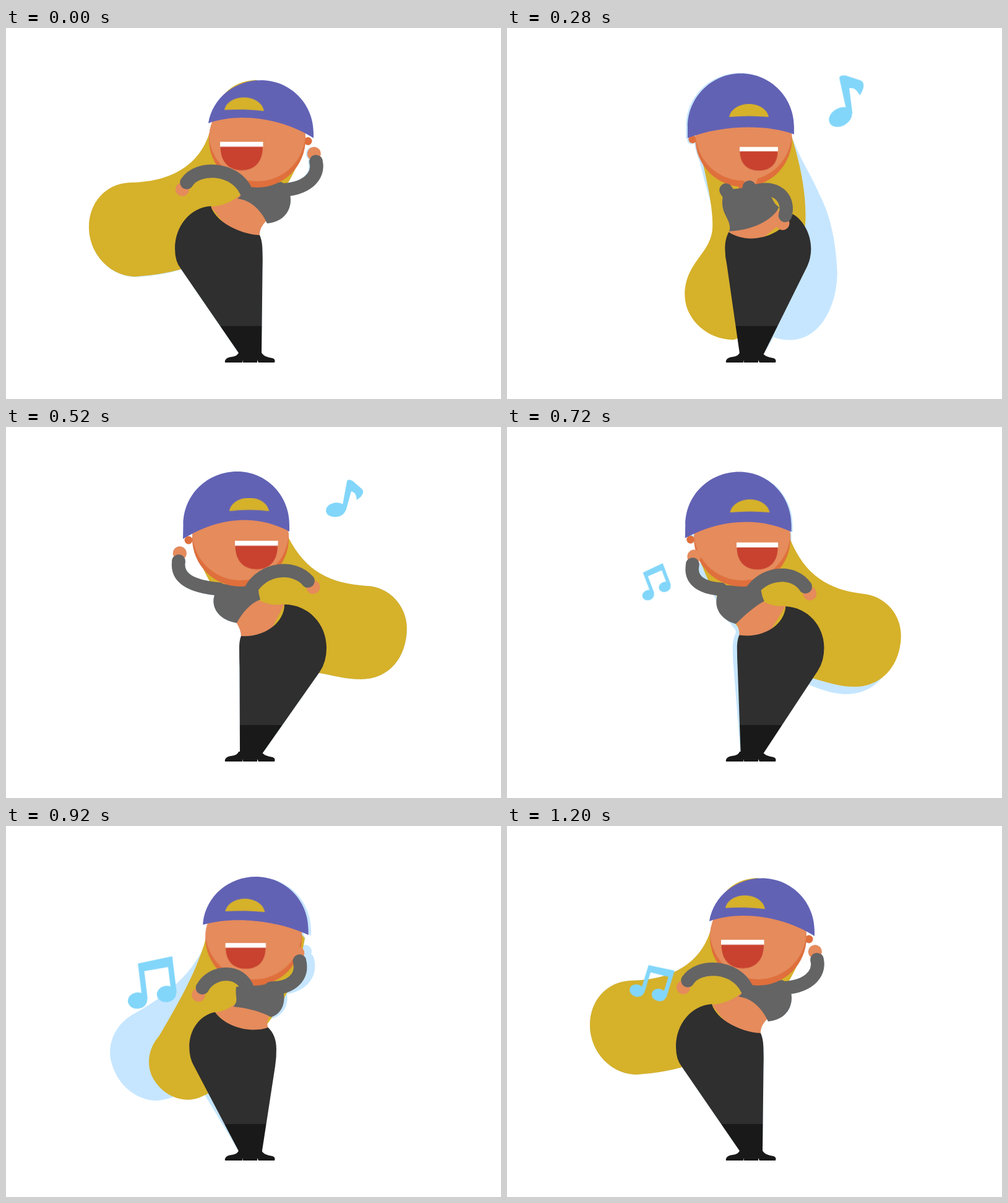
Recreate the animation shown at these times as an HTML page without scripts. Size 800 by 600 pixels, loop 1240 ms.

```html
<!DOCTYPE html>
<html lang="en">
<head>
<meta charset="utf-8">
<title>Dancing girl</title>
<style>
html, body { margin: 0; width: 100%; height: 100%; overflow: hidden; background: #fff; }
svg { display: block; width: 800px; height: 600px; }

.hair, .pants, .belly, .torso, .cap, .arm, .face, .ear, .mouth, .gap, .note {
  animation: 1240ms cubic-bezier(.2, .6, .4, 1) infinite;
}
.hair { animation-name: hair; }
.pants { animation-name: pants; }
.belly { animation-name: belly; }
.torso { animation-name: torso; }
.cap { animation-name: cap; }
.face { animation-name: face; }
.ear { animation-name: ear; }
.mouth { animation-name: mouth; }
.gap { animation-name: gap; }
.arm { fill: none; stroke: #646464; stroke-width: 21.5; stroke-linecap: round; marker-end: url(#hand); }
.hip { animation-name: hip; }
.wave { animation-name: wave; }
.single { animation-name: single; }
.pair { animation-name: pair; }

/* The pale silhouette runs slightly ahead of the figure. */
.shade * { fill: #c6e6ff; animation-delay: -40ms; }
.shade .arm { fill: none; stroke: #c6e6ff; marker-end: url(#palehand); }

@keyframes hair {
  0%, 1.6%, 90.3%, 100% { d: path("M405 84C360 86 340 115 333 152C322 215 275 249 200 250C160 252 134 283 134 322C134 365 168 402 210 402C300 395 330 375 400 320C455 265 475 220 484 180Z"); animation-timing-function: ease-in; }
  12.9% { d: path("M400 84C355 88 333 120 328 175C322 215 280 265 208 272C173 276 148 305 149 340C152 378 185 422 225 422C295 418 340 395 400 330C455 270 472 225 482 180Z"); animation-timing-function: linear; }
  22.58% { d: path("M370 84C330 90 303 150 310 190C322 240 333 290 331 318C330 362 283 375 283 432C283 470 318 506 362 507C400 500 478 400 482 310C483 260 472 215 460 175Z"); animation-timing-function: linear; }
  25.8% { d: path("M370 84C325 90 300 150 308 200C320 260 350 350 375 440C390 485 420 506 455 506C505 506 532 450 532 395C530 350 522 305 504 270C490 235 475 215 460 175Z"); }
  43%, 51.6% { d: path("M370 84C325 90 300 150 306 195C320 250 400 385 507 398C530 402 550 408 573 408C620 408 648 372 648 325C648 290 620 258 583 257C525 253 485 235 456 178Z"); animation-timing-function: ease-in; }
  67.74% { d: path("M370 86C330 90 300 150 308 190C310 260 345 370 455 438C475 453 495 463 520 463C565 463 597 420 597 378C597 350 580 326 548 315C500 297 470 260 462 190Z"); animation-timing-function: linear; }
  71% { d: path("M400 84C350 88 325 130 320 165C295 240 303 320 365 450C380 480 405 500 437 500C485 500 512 460 512 425C510 385 500 340 492 300C485 260 482 220 480 185Z"); }
  80.65% { d: path("M405 84C360 86 340 115 333 152C325 215 275 262 200 295C172 308 154 333 154 365C158 412 195 445 232 445C290 440 330 400 400 320C455 265 475 220 484 180Z"); }
}
@keyframes pants {
  0%, 3.2%, 88.7%, 100% { d: path("M331 288C298 290 273 320 273 357Q273 378 283 390L377 527H413L414.5 390Q415 375 414.5 362C414.5 350 413 342 410 335C375 333 338 312 331 288Z"); animation-timing-function: ease-in; }
  12.9% { d: path("M333 290C304 292 283 322 283 357Q283 376 291 391L377 527H414L422 390Q423 375 423 362C423 350 421 342 419 336C383 336 344 316 333 290Z"); animation-timing-function: linear; }
  22.58% { d: path("M358 330C354 338 352 346 352 357Q352 370 355 383L376 527H415L485 385Q491 372 491 357C491 335 480 312 462 301C445 338 390 352 358 330Z"); }
  40.3%, 53.2% { d: path("M380 338C378 342 377 350 377 357Q377 375 377.5 390L378 527H415L507 396Q518 380 518 357C518 318 488 287 450 287C450 318 415 341 380 338Z"); animation-timing-function: ease-in; }
  67.74% { d: path("M352 328C347 338 345 347 345 357Q345 372 348 385L376 527H415L478 385Q484 372 484 357C484 338 474 318 452 306C440 342 390 352 352 328Z"); }
}
@keyframes belly {
  0%, 3.2%, 88.7%, 100% { d: path("M331 289Q360 287 381 268L436 300Q408 318 410 336L375 345Z"); animation-timing-function: ease-in; }
  12.9% { d: path("M333 291Q350 288 366 280L436 302Q416 318 419 336L380 345Z"); animation-timing-function: linear; }
  22.58% { d: path("M358 331Q360 328 362 318L430 285Q445 305 460 303L400 350Z"); }
  40.3%, 53.2% { d: path("M380 339Q380 328 372 316L400 275Q425 292 450 286L420 345Z"); animation-timing-function: ease-in; }
  67.74% { d: path("M352 328Q356 325 360 318L435 288Q440 296 452 306L400 345Z"); }
}
@keyframes torso {
  0%, 3.2%, 88.7%, 100% { d: path("M380 258L445 249C468 262 468 312 422 316C412 294 395 278 374 276C382 270 382 266 380 258Z"); animation-timing-function: ease-in; }
  12.9% { d: path("M378 258L443 252C463 264 463 308 421 316C405 296 390 284 363 282C375 275 378 268 378 258Z"); animation-timing-function: linear; }
  22.58% { d: path("M352 262L405 256C432 265 425 280 440 290C430 312 395 328 359 329C366 308 338 300 352 262Z"); }
  40.3%, 53.2% { d: path("M352 254L408 260C408 268 409 272 411 279C395 285 382 300 373 317C330 310 325 270 352 254Z"); animation-timing-function: ease-in; }
  67.74% { d: path("M355 265L415 256C432 265 425 284 441 294C425 318 390 329 354 326C366 305 344 300 355 265Z"); }
}
@keyframes cap {
  0%, 3.2%, 87%, 100% { d: path("M327 154L327 154C334 112 371 84.5 412 84.5C459 84.5 497 122 497 170L497 178C450 148 380 135 327 154Z"); animation-timing-function: ease-in; }
  12.9% { d: path("M325 156L325 156C333 112 369 83.5 410 83.5C457 83.5 495 121 495 168L495 178C450 150 380 140 325 156Z"); animation-timing-function: linear; }
  22.58% { d: path("M292 178L292 160C292 112 331 73.5 378 73.5C426 73.5 464 112 464 160L464 172C420 155 345 157 292 178Z"); }
  40.3%, 53.2% { d: path("M286 181L286.5 158C286.5 110 325 72 374 72C420 72 459 110 458 160L458 169C410 143 350 142 286 181Z"); animation-timing-function: ease-in; }
  67.74% { d: path("M297 174L297 162C297 113 336 75.5 383 75.5C430 75.5 468 113 468 162L468 172C420 167 345 168 297 174Z"); }
}
@keyframes gap {
  0%, 3.2%, 87%, 100% { transform: translate(353px, 132.5px) rotate(1.5deg); animation-timing-function: ease-in; }
  12.9% { transform: translate(354px, 135.5px) rotate(1deg); animation-timing-function: linear; }
  22.58% { transform: translate(359px, 144px) rotate(0deg); }
  40.3%, 53.2% { transform: translate(361px, 135.5px) rotate(0deg); animation-timing-function: ease-in; }
  67.74% { transform: translate(358px, 152px) rotate(0deg); }
}
@keyframes face {
  0%, 3.2%, 87%, 100% { transform: translate(406px, 180px); animation-timing-function: ease-in; }
  12.9% { transform: translate(404.5px, 180px); animation-timing-function: linear; }
  22.58% { transform: translate(382.5px, 179px); }
  40.3%, 53.2% { transform: translate(379px, 180px); animation-timing-function: ease-in; }
  67.74% { transform: translate(386px, 181px); }
}
@keyframes ear {
  0%, 3.2%, 87%, 100% { transform: translate(488px, 183px); animation-timing-function: ease-in; }
  12.9% { transform: translate(486px, 182px); animation-timing-function: linear; }
  22.58% { transform: translate(300px, 180px); }
  40.3%, 53.2% { transform: translate(295px, 183px); animation-timing-function: ease-in; }
  67.74% { transform: translate(305px, 177px); }
}
@keyframes mouth {
  0%, 3.2%, 87%, 100% { transform: translate(346px, 183.5px) scale(1); animation-timing-function: ease-in; }
  12.9% { transform: translate(345px, 185px) scale(.97, .95); animation-timing-function: linear; }
  22.58% { transform: translate(376px, 192.5px) scale(.89, .82); }
  40.3%, 53.2% { transform: translate(370px, 183.5px) scale(1); animation-timing-function: ease-in; }
  67.74% { transform: translate(376px, 203.5px) scale(.79, .63); }
}
@keyframes hip {
  0%, 1.6%, 90.3%, 100% { d: path("M388 264C370 225 310 222 292 250"); animation-timing-function: ease-in; }
  12.9% { d: path("M386 262C360 245 318 246 306 281"); animation-timing-function: linear; }
  22.58% { d: path("M405 263C440 255 457 280 449 304"); }
  41.9%, 51.6% { d: path("M395 264C415 227 466 223 488 249"); animation-timing-function: ease-in; }
  67.74% { d: path("M402 263C440 248 466 270 462 292"); }
  80.65% { d: path("M389 264C370 228 313 227 295 257"); }
}
@keyframes wave {
  0%, 1.6%, 91%, 100% { d: path("M442 262C485 262 507 240 501 216"); animation-timing-function: ease-in; }
  12.9% { d: path("M432 262C458 262 467 240 450 218"); animation-timing-function: linear; }
  22.58% { d: path("M354 262C365 282 390 278 393 258"); }
  41.9%, 51.6% { d: path("M344 262C300 258 275 245 279 217"); animation-timing-function: ease-in; }
  67.74% { d: path("M352 264C360 266 366 256 374 240"); }
  80.65% { d: path("M440 262C480 262 498 240 490 215"); }
}
@keyframes single {
  0%, 6% { transform: translate(546px, 140px) rotate(-40deg) scale(0); }
  12.9% { transform: translate(544px, 142px) rotate(-33deg) scale(1.15); animation-timing-function: linear; }
  22.58% { transform: translate(539px, 144px) rotate(-23deg) scale(1.25); animation-timing-function: linear; }
  41.94% { transform: translate(533px, 134px) rotate(0deg) scale(1); animation-timing-function: ease-in; }
  48.4%, 100% { transform: translate(531px, 130px) rotate(8deg) scale(0); }
}
@keyframes pair {
  0%, 56% { transform: translate(240px, 248px) rotate(-24deg) scale(0); }
  62.9% { transform: translate(240px, 248px) rotate(-19deg) scale(.9); animation-timing-function: linear; }
  67.74% { transform: translate(240px, 249px) rotate(-14deg) scale(.95); animation-timing-function: linear; }
  80.65% { transform: translate(240px, 250px) rotate(0deg) scale(1); animation-timing-function: linear; }
  96.77% { transform: translate(239px, 252px) rotate(17deg) scale(.74); animation-timing-function: ease-in; }
  100% { transform: translate(239px, 252px) rotate(21deg) scale(0); }
}
</style>
</head>
<body>
<svg viewBox="0 0 800 600">
  <defs>
    <linearGradient id="legs" gradientUnits="userSpaceOnUse" x1="0" y1="0" x2="0" y2="600">
      <stop offset=".804" stop-color="#2f2f2f"/>
      <stop offset=".804" stop-color="#191919"/>
    </linearGradient>
    <clipPath id="round"><circle r="78"/></clipPath>
    <marker id="hand" markerUnits="userSpaceOnUse" markerWidth="60" markerHeight="60" viewBox="-30 -30 60 60" orient="auto">
      <circle cx="13" r="11" fill="#e58b5c"/>
      <circle r="10.75" fill="#646464"/>
    </marker>
    <marker id="palehand" markerUnits="userSpaceOnUse" markerWidth="60" markerHeight="60" viewBox="-30 -30 60 60" orient="auto">
      <circle cx="13" r="11" fill="#c6e6ff"/>
    </marker>
  </defs>

  <g class="shade">
    <path class="hair"/>
    <path class="belly"/>
    <path class="pants"/>
    <path class="torso"/>
    <circle class="ear" r="6.5"/>
    <circle class="face" r="78"/>
    <path class="cap"/>
    <path class="arm hip"/>
    <path class="arm wave"/>
  </g>

  <path class="hair" fill="#d6b12a"/>
  <path class="belly" fill="#e58b5c"/>
  <path class="pants" fill="url(#legs)"/>
  <path fill="#191919" d="M376 525C372 534 362 530 356 535Q353 538 354 541H382L383 537V541H406V537L408 541H434Q436 536 431 534C420 532 416 530 413 525Z"/>
  <g class="face"><rect x="-8" y="60" width="28" height="24" fill="#df6f3c"/></g>
  <path class="torso" fill="#646464"/>
  <circle class="ear" r="6.5" fill="#df6f3c"/>
  <g class="face">
    <circle r="78" fill="#df6f3c"/>
    <circle cy="-10" r="78" fill="#e58b5c" clip-path="url(#round)"/>
  </g>
  <g class="mouth">
    <path fill="#c8422f" d="M.5 8H69C69 34 55 46.5 35 46.5S.5 34 .5 8Z"/>
    <path fill="#fff" d="M0 0H69.5V8.5H0Z"/>
  </g>
  <path class="cap" fill="#6262b4"/>
  <path class="gap" fill="#d6b12a" d="M0 0C6 -28 58 -28 64 0Q32 -3 0 0Z"/>
  <path class="arm hip"/>
  <path class="arm wave"/>

  <g fill="#82d6fa">
    <g class="note single">
      <ellipse rx="16" ry="11.5" transform="rotate(-8)"/>
      <path d="M16 2L25 -30C28 -29 33 -28 34 -16C43 -22 47 -29 42 -34L27 -47Q19 -51 18 -46L11 -8Z"/>
    </g>
    <g class="note pair">
      <ellipse cx="-32" cy="30" rx="16" ry="13.5"/>
      <ellipse cx="17" cy="25" rx="16" ry="13.5"/>
      <path d="M-24 30V-31L34 -36V25H25V-19L-15 -17V30Z"/>
    </g>
  </g>
</svg>
</body>
</html>
```
